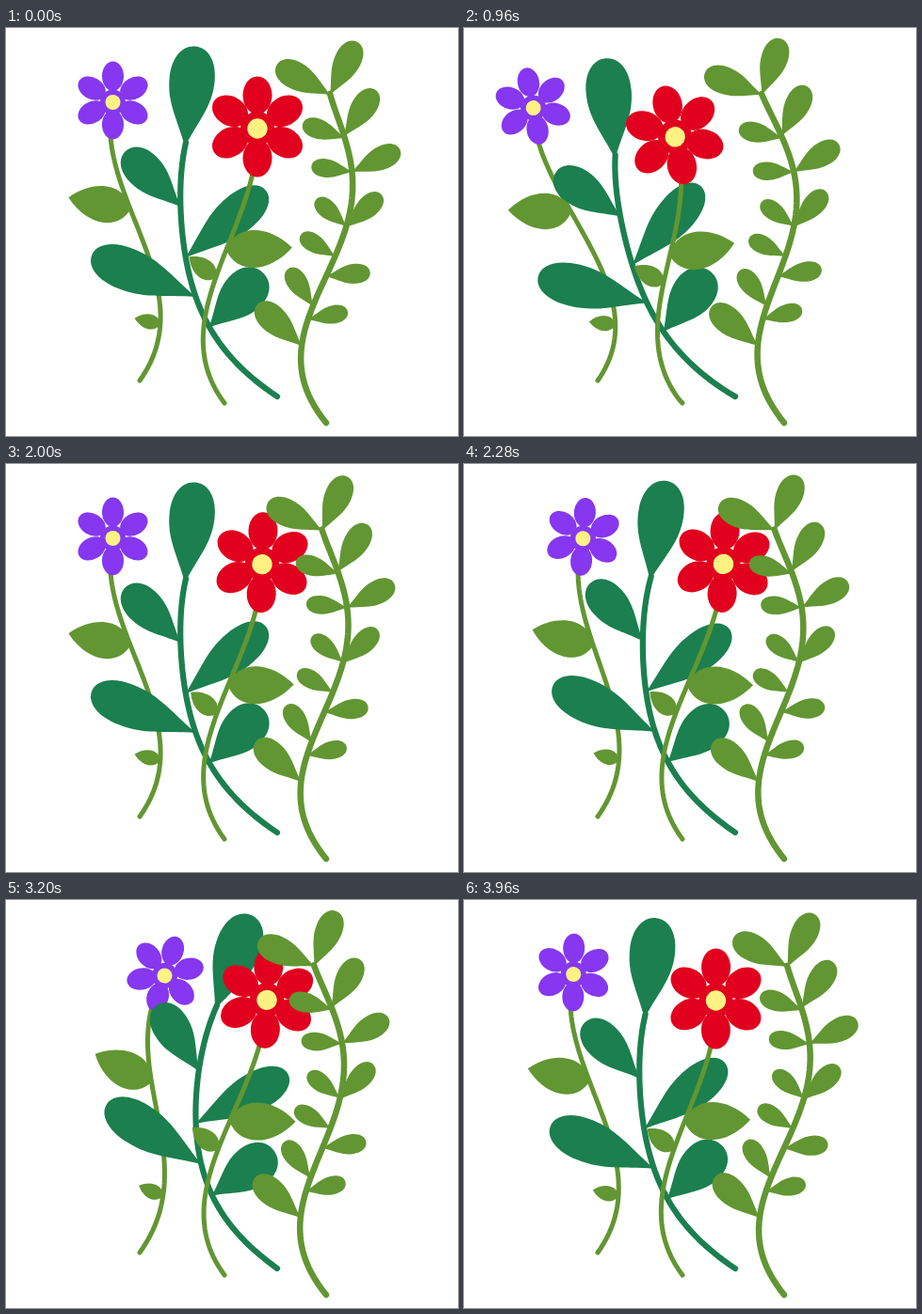
An HTML page with a canvas for the animation above (4 s loop, 480 by 434 pixels).

```html
<!DOCTYPE html>
<html lang="en">
<head>
<meta charset="utf-8">
<title>Swaying flowers</title>
<style>
html, body { margin: 0; width: 100%; height: 100%; overflow: hidden; background: #fff; }
canvas { display: block; }
</style>
</head>
<body>
<canvas id="stage" width="480" height="434"></canvas>
<script>
const ctx = document.getElementById('stage').getContext('2d');
const LOOP = 4000, STEP = 40;
const LEFT_TIME = 800, RIGHT_SWING = 1200;
const GREEN = '#629632', DARK = '#1b7f4f', YELLOW = '#fff283';
const radians = degrees => degrees * Math.PI / 180;

// stem: key points of a smooth curve, top to base. restTime: upright again after the left swing.
// left, right: extreme poses of the top; bend, sag and curl: how fast dx, dy and tilt grow with height.
// leaves: [height on the stem, degrees from upright, length, width ratio].
const plants = [
  {
    color: GREEN, lineWidth: 5, restTime: 2000, sag: 1.6, curl: .3,
    left: { dx: -46, dy: 7, tilt: -12.5, bend: 1.6 },
    right: { dx: 55, dy: 1.5, tilt: 18, bend: 1.85 },
    stem: [[113.5, 79], [111, 115], [131, 190], [163, 290], [142, 375]],
    leafShape: almond,
    leaves: [[193, -79, 67, .57], [315, -77, 28, .57]],
    flower: { color: '#8637ef', length: 41, width: 23, heart: 8 }
  },
  {
    color: DARK, lineWidth: 6.2, restTime: 2000, sag: .75, curl: .35,
    left: { dx: -35, dy: 15, tilt: -13.3, bend: 1.55 },
    right: { dx: 33, dy: -10, tilt: 14.5, bend: 1.85 },
    stem: [[191, 122], [185.5, 165], [188, 225], [207, 300], [288, 392]],
    leafShape: teardrop,
    leaves: [[126, 6, 107, .45], [190, -45, 83, .47], [244, 50, 111, .37],
             [286, -68, 119, .38], [318, 45, 81, .56]]
  },
  {
    color: GREEN, lineWidth: 5, restTime: 1600, sag: .5, curl: .6,
    left: { dx: -53.5, dy: 11, tilt: -16.5, bend: 1.75 },
    right: { dx: 15, dy: -1, tilt: 4.5, bend: 1.75 },
    stem: [[267, 107], [258, 170], [233.5, 237], [210, 318], [232, 399]],
    leafShape: almond,
    leaves: [[236, 88, 70, .57], [266, -51, 36, .57]],
    flower: { color: '#e1001e', length: 53, width: 31, heart: 10.7 }
  },
  {
    color: GREEN, lineWidth: 6.5, restTime: 1600, sag: 1.8, curl: .8,
    left: { dx: -35, dy: 0, tilt: -10, bend: 1.8 },
    right: { dx: -25.5, dy: -1, tilt: -7.5, bend: 1.8 },
    stem: [[344, 70], [360, 118], [367, 185], [340, 264], [314, 338], [340, 420]],
    leafShape: teardrop,
    leaves: [
      ...[[71, -61], [117, -71], [153, -82], [211, -48], [243, -58], [296, -33], [338, -47]]
        .map(([y, angle]) => [y, angle, 43 + 22 * ((y - 205) / 134) ** 4, .45]),
      ...[[71, 27], [115, 34], [153, 65], [212, 47], [264, 85], [310, 79]]
        .map(([y, angle]) => [y, angle, 63 - (y - 71) / 12, .45])
    ]
  }
];

// Polynomial through the stem's key points
function stemX({ stem }, y) {
  return stem.reduce((sum, [x, yi]) => sum + stem.reduce(
    (term, [, yj]) => yj === yi ? term : term * (y - yj) / (yi - yj), x), 0);
}

function poseAt({ left, right, restTime }, t) {
  const rightTime = restTime + RIGHT_SWING;
  if (t < LEFT_TIME) return { ...left, amount: t / LEFT_TIME };
  if (t < restTime) return { ...left, amount: (restTime - t) / (restTime - LEFT_TIME) };
  if (t < rightTime) return { ...right, amount: (t - restTime) / RIGHT_SWING };
  return { ...right, amount: (LOOP - t) / (LOOP - rightTime) };
}

// Where the stem's point at rest height y is now, and how far it is tilted
function pointAt(plant, pose, y) {
  const top = plant.stem[0][1], base = plant.stem.at(-1)[1];
  const s = Math.min(1, (base - y) / (base - top));
  return {
    x: stemX(plant, y) + pose.amount * pose.dx * s ** pose.bend,
    y: y + pose.amount * pose.dy * s ** plant.sag,
    angle: radians(pose.amount * pose.tilt * s ** plant.curl)
  };
}

// Leaf shapes grow upwards from the origin
function teardrop(l, w) {
  const h = w / 2;
  ctx.moveTo(0, 0);
  ctx.bezierCurveTo(-.5 * h, -.28 * l, -h, -.42 * l, -h, -.67 * l);
  ctx.bezierCurveTo(-h, -.87 * l, -.58 * h, -l, 0, -l);
  ctx.bezierCurveTo(.58 * h, -l, h, -.87 * l, h, -.67 * l);
  ctx.bezierCurveTo(h, -.42 * l, .5 * h, -.28 * l, 0, 0);
}

function almond(l, w) {
  const h = w * .67;
  ctx.moveTo(0, 0);
  ctx.bezierCurveTo(-h, -.14 * l, -h, -.64 * l, 0, -l);
  ctx.bezierCurveTo(h, -.64 * l, h, -.14 * l, 0, 0);
}

function fillShape(color, trace) {
  ctx.fillStyle = color;
  ctx.beginPath();
  trace();
  ctx.fill();
}

function onStem(plant, pose, y, draw) {
  const point = pointAt(plant, pose, y);
  ctx.save();
  ctx.translate(point.x, point.y);
  ctx.rotate(point.angle);
  draw();
  ctx.restore();
}

function drawStem(plant, pose) {
  const top = plant.stem[0][1], base = plant.stem.at(-1)[1];
  ctx.strokeStyle = plant.color;
  ctx.lineWidth = plant.lineWidth;
  ctx.beginPath();
  for (let i = 0; i <= 60; i++) {
    const { x, y } = pointAt(plant, pose, base + (top - base) * i / 60);
    ctx.lineTo(x, y);
  }
  ctx.stroke();
}

function drawFlower({ color, length, width, heart }) {
  for (let i = 0; i < 6; i++) {
    ctx.save();
    ctx.translate(0, -2);
    ctx.rotate(i * Math.PI / 3);
    fillShape(color, () => ctx.ellipse(0, -.63 * length, width / 2, .38 * length, 0, 0, 7));
    ctx.restore();
  }
  fillShape(color, () => ctx.arc(0, 0, heart * 1.7, 0, 7));
  fillShape(YELLOW, () => ctx.arc(0, 0, heart, 0, 7));
}

function drawPlant(plant, t) {
  const pose = poseAt(plant, t);
  drawStem(plant, pose);
  for (const [y, degrees, length, ratio] of plant.leaves) {
    onStem(plant, pose, y, () => {
      ctx.rotate(radians(degrees));
      fillShape(plant.color, () => plant.leafShape(length, length * ratio));
    });
  }
  if (plant.flower) onStem(plant, pose, plant.stem[0][1], () => drawFlower(plant.flower));
}

const start = performance.now();
function frame() {
  const elapsed = performance.now() - start;
  const t = Math.floor(elapsed / STEP) * STEP % LOOP;
  ctx.clearRect(0, 0, 480, 434);
  ctx.lineCap = ctx.lineJoin = 'round';
  for (const plant of plants) drawPlant(plant, t);
  requestAnimationFrame(frame);
}
frame();
</script>
</body>
</html>
```
